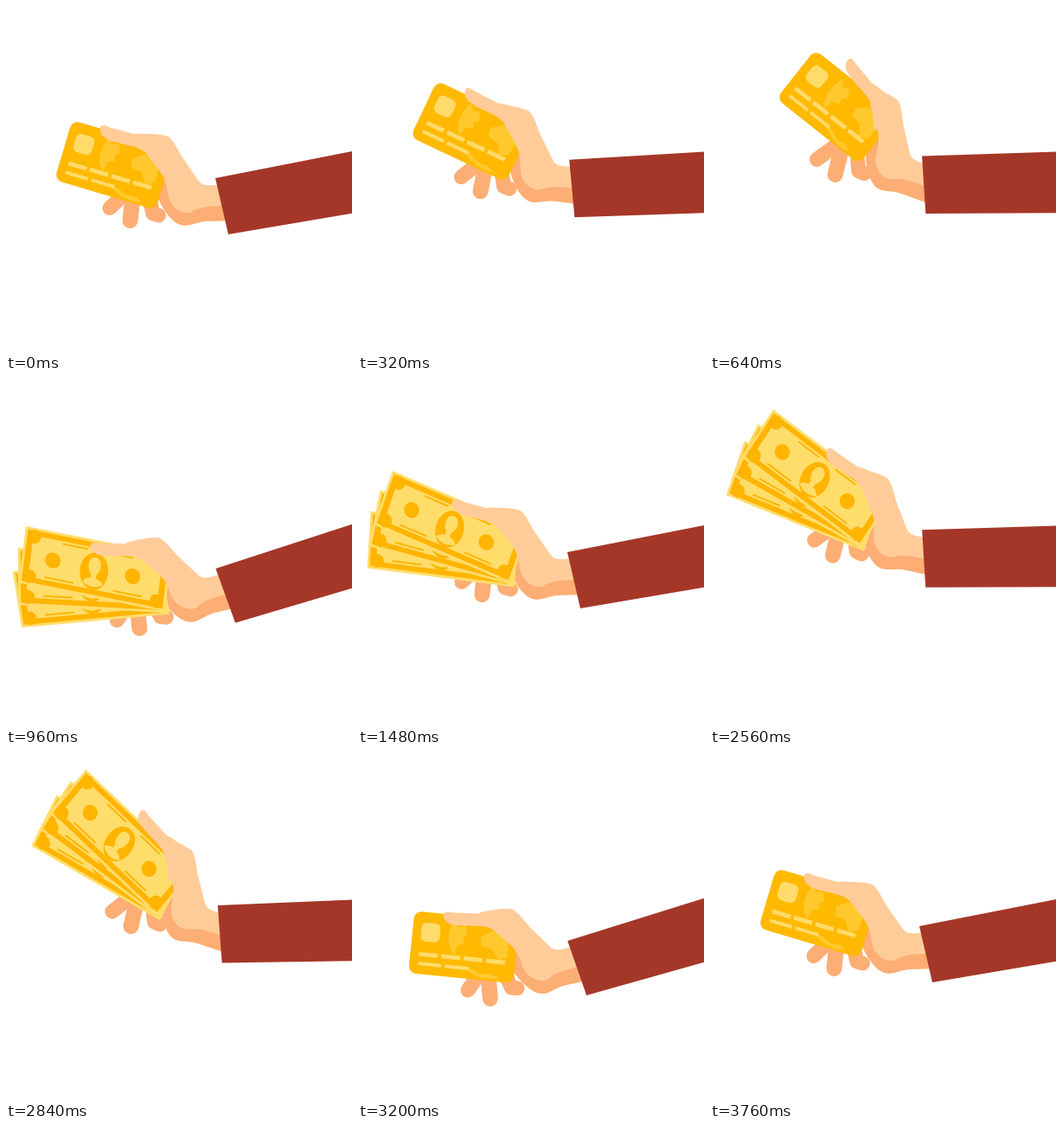
These frames come from a looping animation (400 by 400 pixels, 4320 ms). An HTML page:

```html
<!DOCTYPE html>
<html lang="en">
<head>
<meta charset="utf-8">
<title>Card and cash</title>
<style>
  html, body { margin: 0; width: 100%; height: 100%; overflow: hidden; background: #fff; }
  svg { display: block; width: 100vw; height: 100vh; }
</style>
</head>
<body>
<svg viewBox="0 0 400 400">
  <defs>
    <g id="bill" transform="matrix(.918 .396 -.335 .942 40 105)">
      <rect width="172" height="66" fill="#ffdd6b"/>
      <rect x="3" y="3" width="166" height="60" fill="#ffb400"/>
      <rect x="10" y="9" width="152" height="48" fill="#ffdd6b"/>
      <g fill="#ffb400">
        <circle cx="11" cy="10" r="8"/><circle cx="161" cy="10" r="8"/>
        <circle cx="11" cy="56" r="8"/><circle cx="161" cy="56" r="8"/>
        <circle cx="36" cy="33" r="9"/><circle cx="130" cy="33" r="9"/>
        <ellipse cx="85" cy="36" rx="16.5" ry="21.5"/>
        <path d="M45 11h30v2h-30zM98 11h30v2h-30zM29 53h34v2h-34zM110 53h34v2h-34z"/>
      </g>
      <path d="M85 20c9 0 9 14 3 20v4c5 1 8 3 9 6q-12 8-24 0c1-3 4-5 9-6v-4c-6-6-6-20 3-20z" fill="#ffdd6b"/>
    </g>
  </defs>

  <g id="arm">
    <g id="hand">
      <g id="fingers" fill="none" stroke="#fcae74" stroke-linecap="round" stroke-linejoin="round">
        <path d="M136 218L120 233.5" stroke-width="17"/>
        <path d="M147 215L143.500 248" stroke-width="18"/>
        <path d="M167 228L170 240L176.500 242" stroke-width="17"/>
      </g>
      <path fill="#fcae74" d="M178 195L200 215L262 220L266 248L230 249C220 250 214 254 206 254C196 253 190 245 186 240C181 233 176 225 174 215Z"/>

      <g id="card" transform="translate(76.500 132) rotate(16.500)">
        <rect width="122" height="72" rx="9" fill="#ffb900"/>
        <g fill="#ffc92e">
          <path d="M47 7q-9 16-1 34l5 5 2-11 8-4-2-6 5-4-4-10-8 3z"/>
          <path d="M79 23l12-9 21 2v26l-10 5-8-12-13-2z"/>
          <path d="M62 59l13 2 9 4 12-1 8 4q-22 6-42-9z"/>
        </g>
        <g fill="#ffdb6b">
          <rect x="10" y="12" width="22" height="22" rx="6"/>
          <path d="M10 46.500h22v5h-22zM36 46.500h22v5h-22zM62 46.500h22v5h-22zM88 46.500h22v5h-22zM10 58h27v4h-27zM41 58h28v4h-28z"/>
        </g>
      </g>

      <g id="cash">
        <use href="#bill" class="fan"/>
        <use href="#bill" class="fan"/>
        <use href="#bill" class="fan"/>
      </g>

      <g fill="#ffcc99">
        <path id="thumb" d="M109 143C108 136 115 138 119 140L148 148C162 147 178 149 184 154L186 180L180 192C172 181 163 168 152 164C140 160 125 158 117 154C112 151 109 148 109 143Z"/>
        <path d="M150 148C162 147 182 148 188 151C196 158 199 168 206 178L222 201C226 207 230 208 243 207L262 206L264 231L246 231C230 232 223 233 214 238C206 241 196 236 191 228C187 222 187 214 185 206C183 198 179 192 174 186L160 168Z"/>
      </g>
    </g>
    <path fill="#a53728" d="M242 199L440 160V233L257 264Z"/>
  </g>
</svg>

<script>
  const LOOP = 4320, CARD_START = 20, CASH_START = 2210, SWAP = 655;

  // [time, angle] poses of one swing; the hand and thumb trail the arm
  const ARM = [[0, 0], [520, 12.4], [910, -7], [1270, 0]];
  const HAND = [[255, 0], [540, 17], [820, -6], [1350, 0]];
  const THUMB = [[150, 0], [590, 13], [920, -2], [1440, 0]];

  const el = id => document.getElementById(id);
  const [arm, hand, fingers, thumb, card, cash] =
    ['arm', 'hand', 'fingers', 'thumb', 'card', 'cash'].map(el);
  const fans = document.querySelectorAll('.fan');

  function angleAt(keys, t) {
    if (t <= keys[0][0]) return keys[0][1];
    for (let i = 1; i < keys.length; i++) {
      const [t0, a] = keys[i - 1], [t1, b] = keys[i];
      if (t < t1) return a + (b - a) * (1 - Math.cos(Math.PI * (t - t0) / (t1 - t0))) / 2;
    }
    return keys[keys.length - 1][1];
  }

  const set = (node, transform) => node.setAttribute('transform', transform);
  const turn = (node, angle, x, y) => set(node, `rotate(${angle} ${x} ${y})`);

  function draw(now) {
    const t = now % LOOP;
    const second = t >= CASH_START;
    const s = t - (second ? CASH_START : CARD_START);
    const lag = angleAt(THUMB, s), push = Math.max(0, lag);

    turn(arm, angleAt(ARM, s), 400, 205);
    turn(hand, angleAt(HAND, s), 243, 222);
    turn(thumb, lag, 170, 167);
    set(fingers, `translate(0 ${push * .5}) rotate(${-push * 1.1} 160 215)`);

    fans.forEach((fan, n) => {
      const i = 2 - n;
      set(fan, `translate(${i * 2.5} ${i * 1.5}) rotate(${i * (lag * .1 - 8)} 180 235)`);
    });

    const showCash = (s >= SWAP) !== second;
    card.style.display = showCash ? 'none' : '';
    cash.style.display = showCash ? '' : 'none';
  }

  const start = performance.now();
  function tick() {
    draw(performance.now() - start);
    requestAnimationFrame(tick);
  }
  tick();
</script>
</body>
</html>
```
